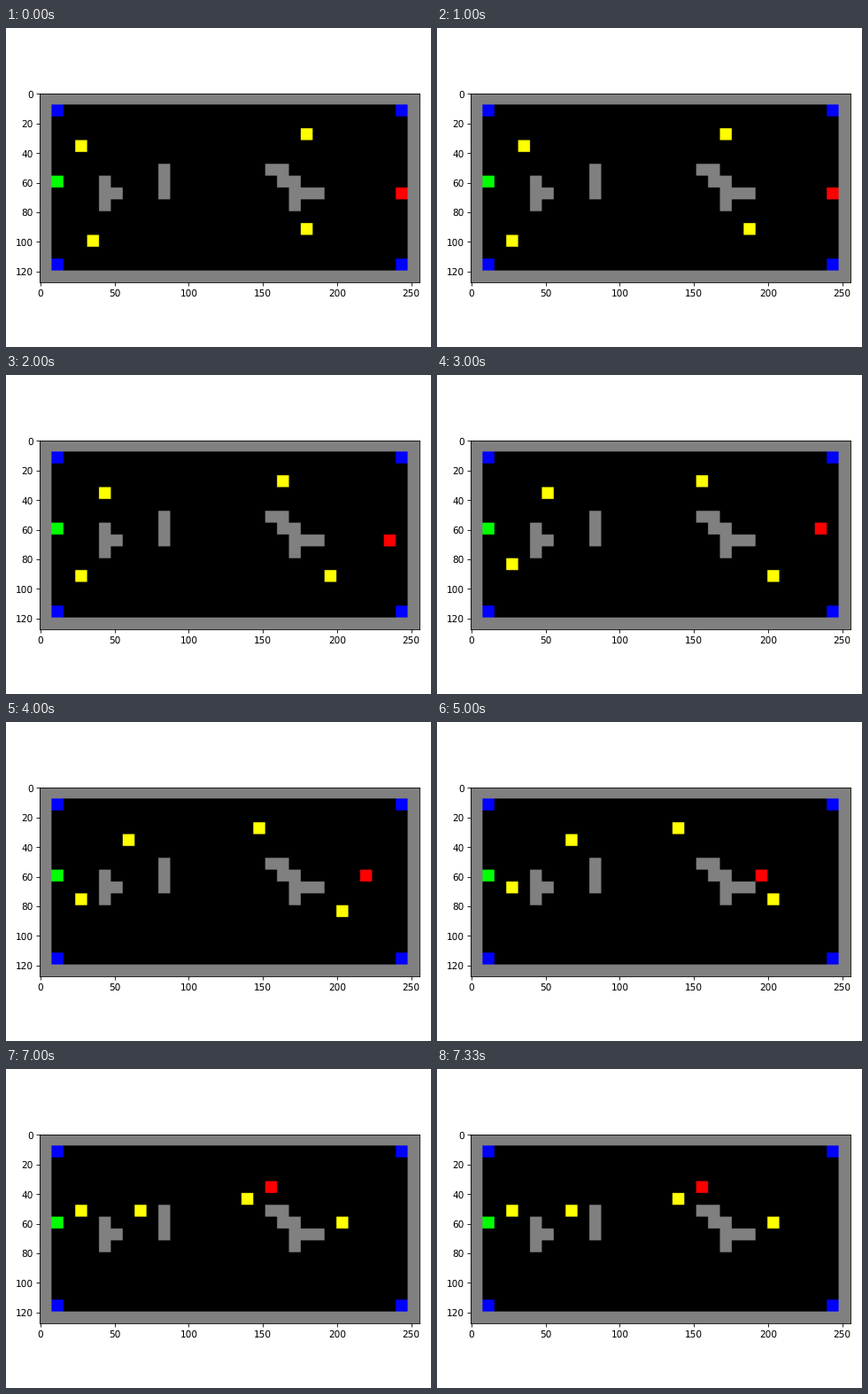
Write a matplotlib script that moves like this. It is 480x360 px and loops after 8000 ms.

```python
import numpy as np
import matplotlib.pyplot as plt
from matplotlib.animation import FuncAnimation

plt.rcParams["text.hinting"] = "none"

W, H, DPI = 480, 360, 75
ROWS, COLS, CELL = 16, 32, 8
STEPS, STEP_MS = 8, 1000

GRAY, BLUE, GREEN = (128, 128, 128), (0, 0, 255), (0, 255, 0)
RED, YELLOW = (255, 0, 0), (255, 255, 0)

# Start column, start row and the column where each walker turns
WALKERS = [(3, 4, 8), (4, 12, 3), (22, 3, 17), (22, 11, 25)]
# Corners of the chaser's route
ROUTE = np.array([(30, 8), (29, 8), (29, 7), (24, 7), (22, 5), (19, 4)])
REACHED = np.append(0, np.cumsum(np.hypot(*np.diff(ROUTE, axis=0).T)))


def make_board():
    grid = np.zeros((ROWS, COLS, 3), dtype=np.uint8)
    grid[[0, -1]] = GRAY
    grid[:, [0, -1]] = GRAY
    # T shape, bar, then a staircase with a T at its foot
    for col, row in [(5, 7), (10, 6), (21, 7)]:
        grid[row:row + 3, col] = GRAY
    grid[8, 6] = GRAY
    grid[8, 22:24] = GRAY
    for i in range(2):
        grid[6 + i, 19 + i:21 + i] = GRAY
    grid[1:-1:ROWS - 3, 1:-1:COLS - 3] = BLUE
    grid[7, 1] = GREEN
    return grid


BOARD = make_board()


def walker(step, col, row, turn):
    """Walk along the row to the turn, then towards the middle row."""
    across = min(step, abs(turn - col))
    col += across * np.sign(turn - col)
    row += (step - across) * np.sign(ROWS // 2 - row)
    return row, col


def chaser(step):
    """Follow the route at a steadily growing speed."""
    dist = round(step * (step - 1) / 3)
    col, row = (round(np.interp(dist, REACHED, axis)) for axis in ROUTE.T)
    return row, col


def render(step):
    grid = BOARD.copy()
    for start in WALKERS:
        grid[walker(step, *start)] = YELLOW
    grid[chaser(step)] = RED
    return grid.repeat(CELL, axis=0).repeat(CELL, axis=1)


fig = plt.figure(figsize=(W / DPI, H / DPI), dpi=DPI, facecolor="white")
ax = fig.add_axes([38.2 / W, 72.55 / H, 428.6 / W, 213.9 / H])
image = ax.imshow(render(0), aspect="auto")
ax.set_xticks(range(0, 251, 50))
ax.set_yticks(range(0, 121, 20))
ax.tick_params(labelsize=10.1)


def update(step):
    image.set_data(render(step))
    return [image]


anim = FuncAnimation(fig, update, frames=STEPS, interval=STEP_MS,
                     init_func=lambda: update(0), repeat=True, repeat_delay=0)
plt.show()
```
